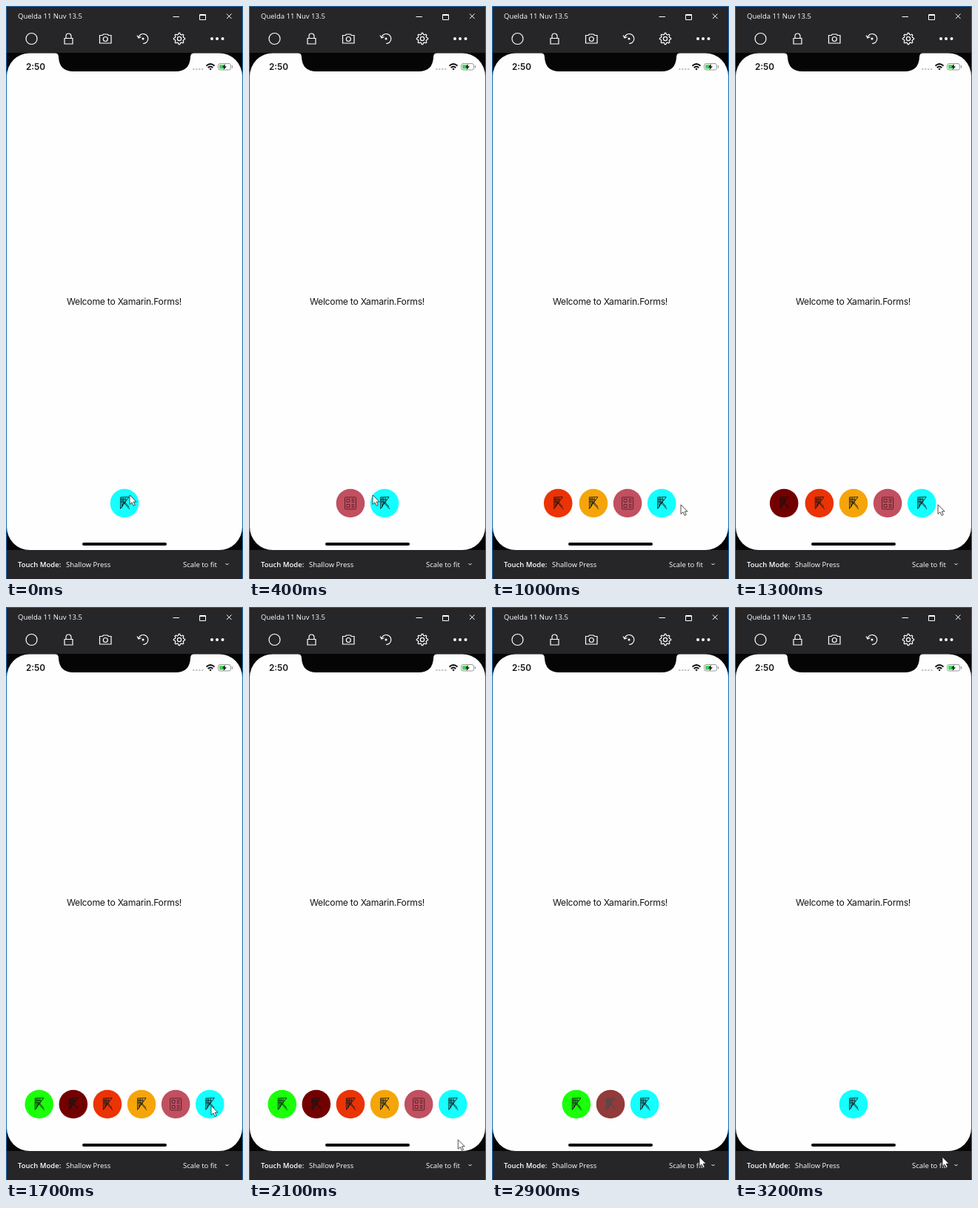
Write an HTML page that moves like this. It is 320x771 px and loops after 3300 ms.

```html
<!DOCTYPE html>
<html lang="en">
<head>
<meta charset="utf-8">
<title>Expanding button row</title>
<style>
  html, body { margin: 0; width: 100%; height: 100%; overflow: hidden; background: #262528; }
  svg { display: block; width: 320px; height: 771px; }
  .chrome { font: 9.5px "Open Sans", "Noto Sans", sans-serif; fill: #fff; }
  .line { fill: none; stroke: #fff; stroke-width: 1.2; }
  .phone { font-family: Inter, "Liberation Sans", sans-serif; fill: #151515; }
</style>
</head>
<body>
<svg viewBox="0 0 320 771">
  <defs>
    <g id="arrow" fill="none" stroke="#101416" stroke-width="1" opacity=".85">
      <path d="M-5.5 -8V7.500L6 -8.300ZM-3.500 -7.500V4M-1.500 -7.500V1M1 -7.500V-2M-5.500 -5H3M-5.500 -2H1M-4 6L-1 -1L7 8M0 -2L6 5"/>
    </g>
    <g id="news" fill="none" stroke="#3d1018" stroke-width="1" opacity=".75">
      <rect x="-7.500" y="-8" width="15" height="16" rx="1"/>
      <path d="M-5 -5.500H-1V-1.500H-5ZM1.500 -5.500H5.500M1.500 -3.500H5.500M1.500 -1.500H5.500M-5 1.500H-1V5.500H-5ZM1.500 1.500H5.500M1.500 3.500H5.500M1.500 5.500H5.500"/>
    </g>
  </defs>

  <rect width="320" height="771" fill="#262528"/>
  <rect y="63" width="320" height="669" fill="#050506"/>
  <rect x="1" y="63.500" width="318" height="668.500" rx="31" fill="#fefefe"/>
  <path d="M66 63Q71 63.500 71 69Q72 88 91 88H229Q248 88 249 69Q249 63.500 254 63Z" fill="#050506"/>
  <rect x="103" y="722" width="114" height="4" rx="2" fill="#080808"/>

  <g class="chrome">
    <text x="16" y="17">Quelda 11 Nuv 13.5</text>
    <text x="16" y="755" font-weight="600">Touch Mode:</text>
    <text x="81" y="755">Shallow Press</text>
    <text x="239" y="755">Scale to fit</text>
    <circle cx="278" cy="44" r="2"/><circle cx="285" cy="44" r="2"/><circle cx="292.500" cy="44" r="2"/>
    <circle cx="185" cy="44" r="1.500"/>
  </g>
  <g class="line">
    <path d="M225.500 14.500H234M298 10.500L304.500 17M304.500 10.500L298 17" stroke-width="1"/>
    <path d="M261.500 11.500H269.500V18.500H261.500ZM261 12.500H270" stroke-width="1"/>
    <circle cx="34.500" cy="44" r="7.500"/>
    <path d="M79 43.500H90V51H79ZM81 43.500V40.500A3.500 3.500 0 0 1 88 40.500V43.500"/>
    <path d="M126.500 39.500H130L131.500 38H137L138.500 39.500H142V50H126.500Z"/>
    <circle cx="134.300" cy="44.500" r="3"/>
    <path d="M179 42.500A6.500 6.500 0 1 1 185 50.500M177 39.500L179 43L182.500 41.500"/>
    <path id="gear"/>
    <circle cx="234" cy="44" r="2.600"/>
    <path d="M296.500 750L298.500 752L300.500 750" stroke-width="1"/>
  </g>

  <g class="phone">
    <text x="27" y="86" font-size="11.800" font-weight="600">2:50</text>
    <text x="159.500" y="401.500" font-size="12.200" letter-spacing="-.02em" text-anchor="middle">Welcome to Xamarin.Forms!</text>
    <path d="M252 85H267" stroke="#c8c8c8" stroke-width="2" stroke-dasharray="2.500 1.500"/>
    <g fill="none" stroke="#080808" stroke-width="1.800">
      <path d="M270.500 80.500Q276 75.500 281.500 80.500M272.700 83Q276 80 279.300 83"/>
    </g>
    <path d="M274.300 84.500Q276 83 277.700 84.500L276 86.500Z"/>
    <rect x="286.500" y="77.500" width="17" height="8.500" rx="2.500" fill="#fff" stroke="#999"/>
    <rect x="288" y="79" width="8" height="5.500" rx="1" fill="#43d45b"/>
    <path d="M305.500 80V83.500" stroke="#999" stroke-width="1.200"/>
    <path d="M296 78L291.800 82.500H294.500L293.500 86L298 81.300H295.200Z"/>
  </g>

  <g id="row"></g>
  <path d="M.500 732V.500H319.500V771M.500 732V771" fill="none" stroke="#1c6aae"/>
  <path id="cursor" d="M0 0V12.500L3 9.900L5.100 14.500L7.200 13.500L5.200 9.100H9Z" fill="#fff" stroke="#222" stroke-width=".8"/>
</svg>
<script>
const LOOP = 3300, STEP = 100, GAP = 46.1, SLIDE = 200, FADE = 150;
const CLOSE_START = 2361, CLOSE_GAP = 168;
const CYAN = "#14ffff", PRESSED = "#8f2c3a";
const items = [
  { color: "#c15060", icon: "news", opens: 180 },
  { color: "#f5a50a", opens: 480 },
  { color: "#eb3305", opens: 880 },
  { color: "#730000", opens: 1180 },
  { color: "#1aff0a", opens: 1480 }
];
// time, x, y
const cursorPath = [
  [0, 167, 658], [400, 167, 658], [600, 203, 664], [800, 234, 669], [1000, 255, 671],
  [1200, 271, 671], [1400, 277, 671], [1800, 277, 671], [2200, 284, 732],
  [2500, 283, 735], [2800, 280, 740], [LOOP, 280, 740]
];
const byId = id => document.getElementById(id);
const clamp = v => Math.max(0, Math.min(1, v));

function gearPath(cx, cy, teeth) {
  const points = [];
  for (let i = 0; i < teeth * 4; i++) {
    const angle = (i - .5) * Math.PI / teeth / 2;
    const r = i % 4 < 2 ? 7.6 : 5.8;
    points.push((cx + r * Math.cos(angle)).toFixed(2) + " " + (cy + r * Math.sin(angle)).toFixed(2));
  }
  return "M" + points.join("L") + "Z";
}

function makeButton(color, icon = "arrow") {
  const group = document.createElementNS("http://www.w3.org/2000/svg", "g");
  group.innerHTML = `<circle r="19.300" fill="${color}"/><use href="#${icon}"/>`;
  byId("row").append(group);
  return group;
}

function place(node, x, y) {
  node.setAttribute("transform", `translate(${x.toFixed(2)} ${y.toFixed(2)})`);
}

function cursorAt(t) {
  const next = cursorPath.findIndex(p => p[0] > t);
  const [t0, x0, y0] = cursorPath[next - 1], [t1, x1, y1] = cursorPath[next];
  const k = (t - t0) / (t1 - t0);
  return [x0 + (x1 - x0) * k, y0 + (y1 - y0) * k];
}

function render(t) {
  const shown = items.filter(item => t >= item.opens && t < item.closes + FADE);
  const slotX = slot => 160 + (shown.length / 2 - slot) * GAP;
  for (const item of items) {
    const slot = shown.indexOf(item) + 1;
    item.node.style.display = slot ? "" : "none";
    if (!slot) continue;
    const left = 1 - clamp((t - item.opens) / SLIDE);
    place(item.node, slotX(slot) - 10 * left * left, 669);
    item.node.setAttribute("opacity", 1 - clamp((t - item.closes) / FADE));
  }
  const pressed = t >= CLOSE_START && t < CLOSE_START + CLOSE_GAP;
  main.firstChild.setAttribute("fill", pressed ? PRESSED : CYAN);
  main.lastChild.setAttribute("opacity", pressed ? .5 : 1);
  place(main, slotX(0), 669);
  place(byId("cursor"), ...cursorAt(t));
}

byId("gear").setAttribute("d", gearPath(234, 44, 8));
items.forEach((item, i) => {
  item.node = makeButton(item.color, item.icon);
  item.closes = CLOSE_START + i * CLOSE_GAP;
});
const main = makeButton(CYAN);
const start = performance.now();

function tick() {
  const t = (performance.now() - start) % LOOP;
  render(Math.floor(t / STEP) * STEP);
  requestAnimationFrame(tick);
}
tick();
</script>
</body>
</html>
```
